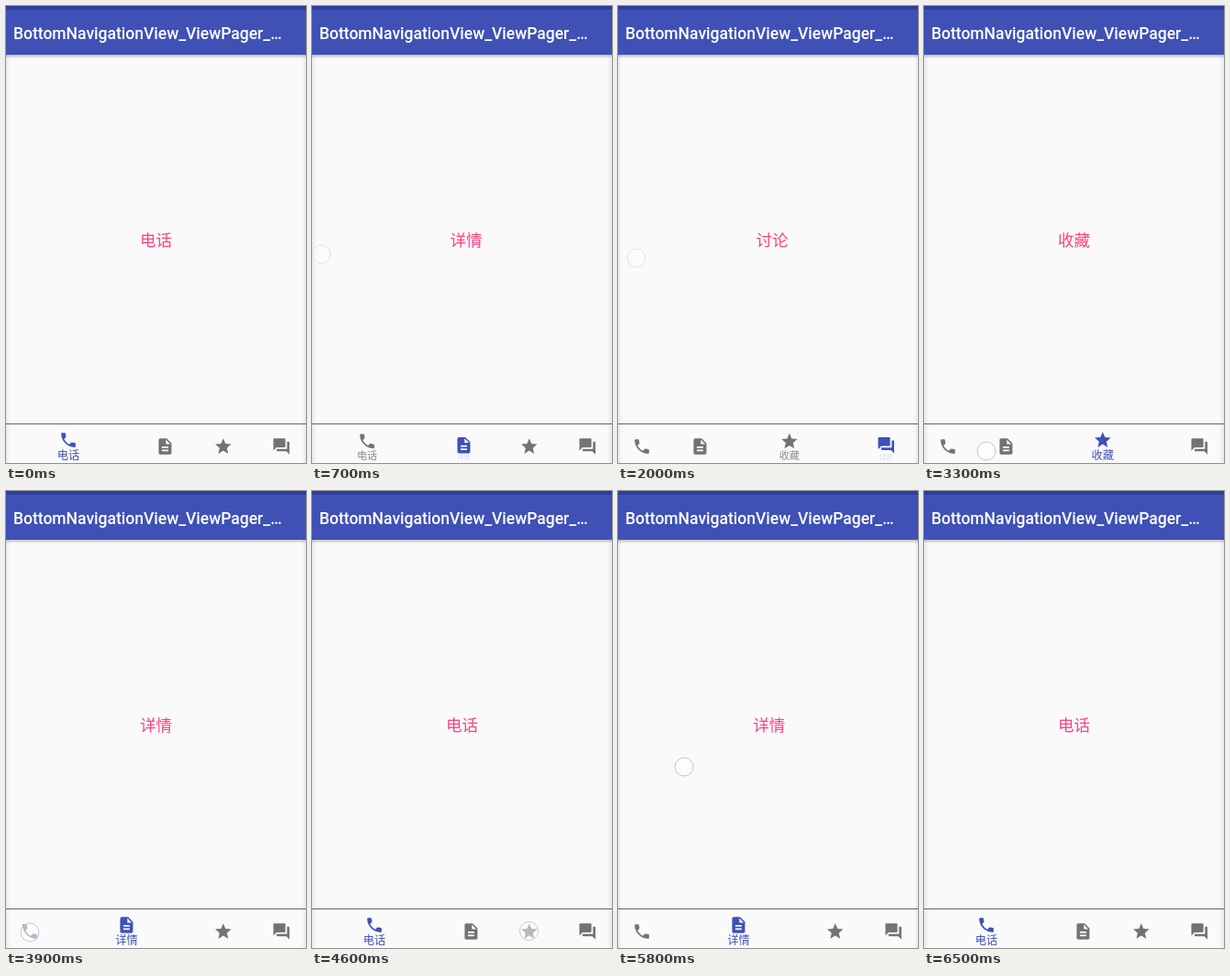
An HTML page that plays this animation: 327 by 497 pixels, repeating every 6600 ms.

```html
<!DOCTYPE html>
<html lang="zh-CN">
<head>
<meta charset="utf-8">
<style>
  html, body { margin: 0; width: 100%; height: 100%; overflow: hidden; background: #fafafa; }
  svg { display: block; width: 100vw; height: 100vh; }
  text { font-family: "Noto Sans CJK SC", "Noto Sans CJK", sans-serif; text-anchor: middle; }
  .title { font: 500 17.5px Roboto, sans-serif; text-anchor: start; fill: #fff; }
  .page { font-size: 17.5px; fill: #ff4081; }
  .label { font-size: 12.25px; }
</style>
</head>
<body>
<svg viewBox="0 0 327 497">
  <defs>
    <linearGradient id="drop" x2="0" y2="1">
      <stop stop-opacity=".24"/><stop offset="1" stop-opacity="0"/>
    </linearGradient>
    <linearGradient id="edge">
      <stop stop-opacity=".07"/><stop offset="1" stop-opacity="0"/>
    </linearGradient>
  </defs>
  <rect width="327" height="497" fill="#fafafa"/>
  <g id="pages"></g>
  <rect y="53" width="327" height="4" fill="url(#drop)"/>
  <rect width="327" height="53" fill="#3f51b5"/>
  <rect width="327" height="4" fill="#303f9f"/>
  <text class="title" x="8" y="36">BottomNavigationView_ViewPager_…</text>
  <rect y="454" width="327" height="1" fill="#666"/>
  <g id="nav"></g>
  <rect y="53" width="5" height="444" fill="url(#edge)"/>
  <rect y="53" width="5" height="444" fill="url(#edge)" transform="matrix(-1 0 0 1 327 0)"/>
  <circle id="touch" r="10" fill="#fff" fill-opacity=".5" stroke="#bfc4e6"/>
</svg>
<script>
const LOOP = 6600, WIDTH = 327, BLUE = '#3f51b5', GREY = '#737373';
const SMALL = 63.4, LARGE = 147.4, NAV_LEFT = -5.7;

const tabs = [
  ['电话', 'M6.62 10.79c1.44 2.83 3.76 5.14 6.59 6.59l2.2-2.2c.27-.27.67-.36 1.02-.24 1.12.37 2.33.57 3.57.57.55 0 1 .45 1 1V20c0 .55-.45 1-1 1-9.39 0-17-7.61-17-17 0-.55.45-1 1-1h3.5c.55 0 1 .45 1 1 0 1.25.2 2.45.57 3.57.11.35.03.74-.25 1.02l-2.2 2.2z'],
  ['详情', 'M14 2H6c-1.1 0-1.99.9-1.99 2L4 20c0 1.1.89 2 1.99 2H18c1.1 0 2-.9 2-2V8l-6-6zm2 16H8v-2h8v2zm0-4H8v-2h8v2zm-3-5V3.5L18.5 9H13z'],
  ['收藏', 'M12 17.27L18.18 21l-1.64-7.03L22 9.24l-7.19-.61L12 2 9.19 8.63 2 9.24l5.46 4.73L5.82 21z'],
  ['讨论', 'M21 6h-2v9H6v2c0 .55.45 1 1 1h11l4 4V7c0-.55-.45-1-1-1zm-4 6V3c0-.55-.45-1-1-1H3c-.55 0-1 .45-1 1v14l4-4h10c.55 0 1-.45 1-1z']
];

// Gestures: start time, tab reached, finger from x, y; swipes also have an end x, y
const gestures = [
  { t: 400, to: 1, from: [262, 290], end: [10, 270] },
  { t: 1100, to: 2, from: [275, 288], end: [9, 269] },
  { t: 1700, to: 3, from: [280, 292], end: [20, 274] },
  { t: 2510, to: 2, from: [20, 285], end: [285, 280] },
  { t: 3290, to: 1, from: [68, 484] },
  { t: 3900, to: 0, from: [26, 480] },
  { t: 4590, to: 2, from: [236.5, 478.5] },
  { t: 5150, to: 1, from: [50, 295], end: [290, 290] },
  { t: 5800, to: 0, from: [71, 300], end: [292, 292], shift: 265 }
];
const SELECT = 190, SHIFT = 269, SHIFT_TIME = 115;

const clamp = v => Math.min(1, Math.max(0, v));
const mix = (a, b, k) => a + (b - a) * k;
const smooth = v => v * v * (3 - 2 * v);
const find = id => document.getElementById(id);

function add(parent, tag, attrs, text = '') {
  const el = document.createElementNS('http://www.w3.org/2000/svg', tag);
  set(el, attrs);
  el.textContent = text;
  return parent.appendChild(el);
}
function set(el, attrs) {
  for (const key in attrs) el.setAttribute(key, attrs[key]);
}

const views = tabs.map(([name, d]) => ({
  page: add(find('pages'), 'text', { class: 'page', y: 261 }, name),
  icon: add(find('nav'), 'path', { d }),
  label: add(find('nav'), 'text', { class: 'label' }, name)
}));

// Drag, then fling to rest, in steps of 100 ms
const scrollStops = [0, .385, .856, .986, 1];
function scrollAt(u) {
  const s = clamp(u / 400) * 4, i = Math.min(3, Math.floor(s));
  return mix(scrollStops[i], scrollStops[i + 1], s - i);
}

function centre(i, active) {
  if (i === active) return NAV_LEFT + i * SMALL + LARGE / 2;
  return NAV_LEFT + (i + .5) * SMALL + (i > active ? LARGE - SMALL : 0);
}

function draw(t) {
  let scroll = 0, chosen = 0, before = 0, active = 0, k = 1, touch = null;
  for (const g of gestures) {
    const u = t - g.t;
    if (u < 0) break;
    const last = chosen;
    scroll = g.end ? mix(last, g.to, scrollAt(u)) : u < SELECT ? last : g.to;
    if (u >= SELECT) chosen = g.to;
    const shift = g.shift || SHIFT;
    if (u >= shift) {
      before = last;
      active = g.to;
      k = smooth(clamp((u - shift) / SHIFT_TIME));
    }
    touch = u < 390 ? { g, u } : null;
  }

  views.forEach(({ page, icon, label }, i) => {
    const x = mix(centre(i, before), centre(i, active), k);
    const on = mix(+(i === before), +(i === active), k);
    const fill = i === chosen ? BLUE : GREY;
    set(page, { x: WIDTH / 2 + (i - scroll) * WIDTH });
    set(icon, {
      fill,
      transform: `translate(${x} ${479 - 7 * on}) scale(.875) translate(-12 -12)`
    });
    set(label, {
      fill, opacity: on,
      transform: `translate(${x} 493.3) scale(${.5 + on / 2})`
    });
  });

  const dot = find('touch');
  if (!touch) return set(dot, { opacity: 0 });
  const { g, u } = touch, end = g.end || g.from, m = clamp(u / 200);
  set(dot, {
    cx: mix(g.from[0], end[0], m),
    cy: mix(g.from[1], end[1], m),
    opacity: 1 - clamp((u - 220) / 150)
  });
}

const start = performance.now();
function tick() {
  draw((performance.now() - start) % LOOP);
  requestAnimationFrame(tick);
}
tick();
</script>
</body>
</html>
```
